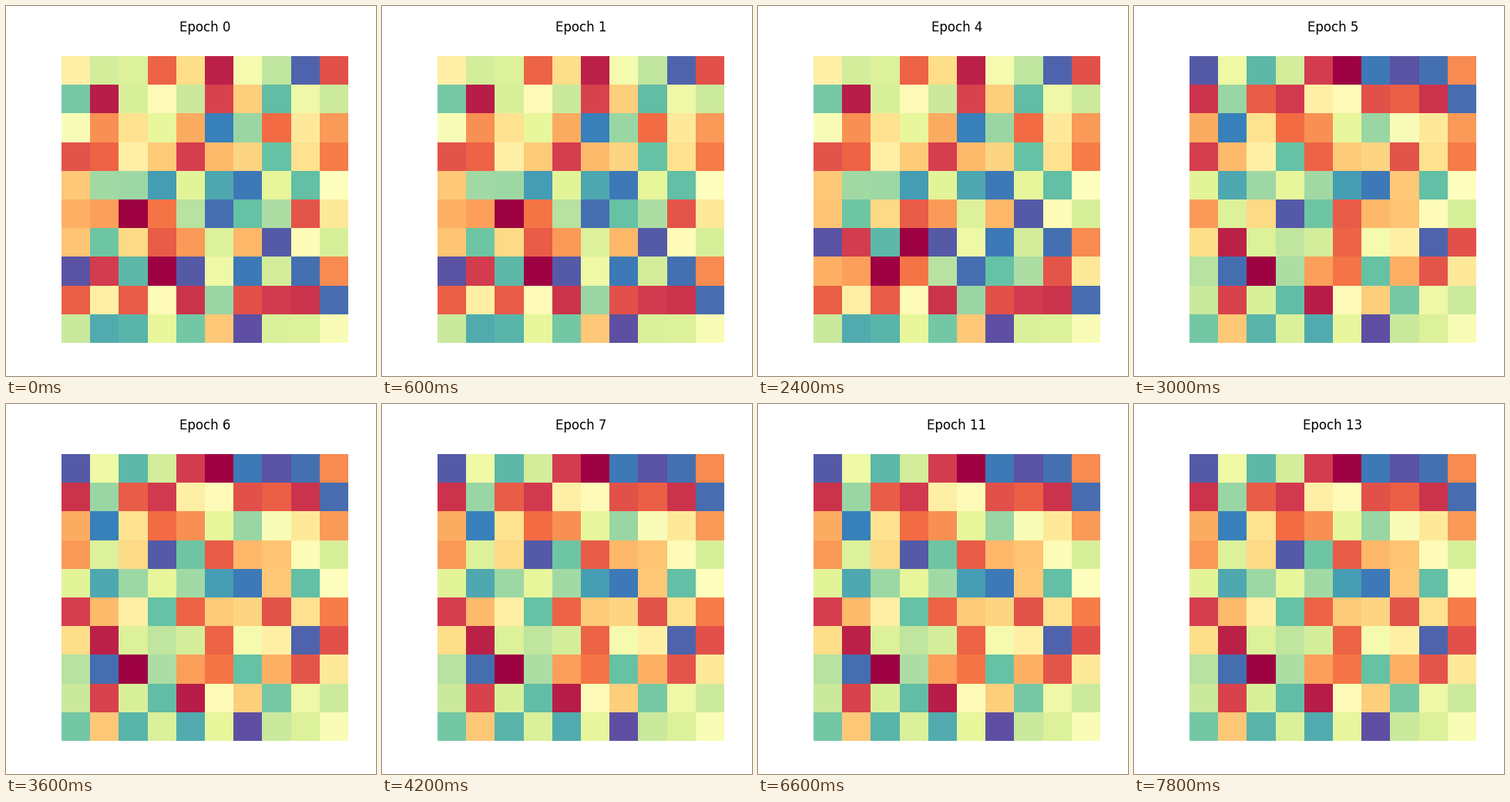
Animation of 480 by 480 pixels, one loop 8 s. Source, as a matplotlib script:

```python
import matplotlib.pyplot as plt
import numpy as np
from matplotlib.animation import FuncAnimation

SIZE = 480
TICK = 200
TICKS = 40
EPOCH_TICKS = 3

# Cell values in thousandths of the colour scale
weights = np.array([
    [450, 630, 615, 180, 395, 53, 540, 663, 963, 142],
    [775, 48, 624, 488, 645, 110, 365, 808, 560, 642],
    [520, 254, 410, 588, 298, 914, 726, 198, 430, 270],
    [147, 182, 453, 358, 103, 327, 378, 797, 407, 224],
    [354, 711, 720, 860, 602, 840, 922, 590, 804, 500],
    [305, 279, 0, 212, 678, 943, 797, 699, 150, 429],
    [344, 788, 390, 166, 270, 616, 321, 977, 487, 624],
    [989, 100, 814, 0, 977, 564, 922, 632, 938, 249],
    [170, 453, 165, 488, 83, 724, 141, 97, 85, 949],
    [648, 838, 821, 586, 778, 355, 998, 620, 616, 520],
]) / 1000

IDENTITY = list(range(10))
SHUFFLED_COLS = [4, 5, 2, 7, 1, 3, 6, 0, 8, 9]

# First epoch of each arrangement, then its row and column order
arrangements = [
    (0, IDENTITY, IDENTITY),
    (4, [0, 1, 2, 3, 4, 6, 7, 5, 8, 9], IDENTITY),
    (5, [7, 8, 2, 3, 4, 6, 0, 5, 1, 9], SHUFFLED_COLS),
    (6, [7, 8, 2, 6, 4, 3, 0, 5, 1, 9], SHUFFLED_COLS),
]


def arranged(epoch):
    _, rows, cols = [a for a in arrangements if a[0] <= epoch][-1]
    return weights[np.ix_(rows, cols)]


fig = plt.figure(figsize=(SIZE / 100, SIZE / 100), dpi=100, facecolor="white")
ax = fig.add_axes([72 / SIZE, 43 / SIZE, 372 / SIZE, 372 / SIZE])
ax.axis("off")
image = ax.imshow(weights, cmap="Spectral", vmin=0, vmax=1,
                  interpolation="nearest", aspect="auto")
title = fig.text(258 / SIZE, 447 / SIZE, "", ha="center", va="baseline",
                 family="DejaVu Sans", size=12, color="black")


def update(tick):
    epoch = tick // EPOCH_TICKS
    image.set_data(arranged(epoch))
    title.set_text(f"Epoch {epoch}")
    return image, title


anim = FuncAnimation(fig, update, frames=TICKS, interval=TICK,
                     repeat=True, repeat_delay=0)
plt.show()
```
